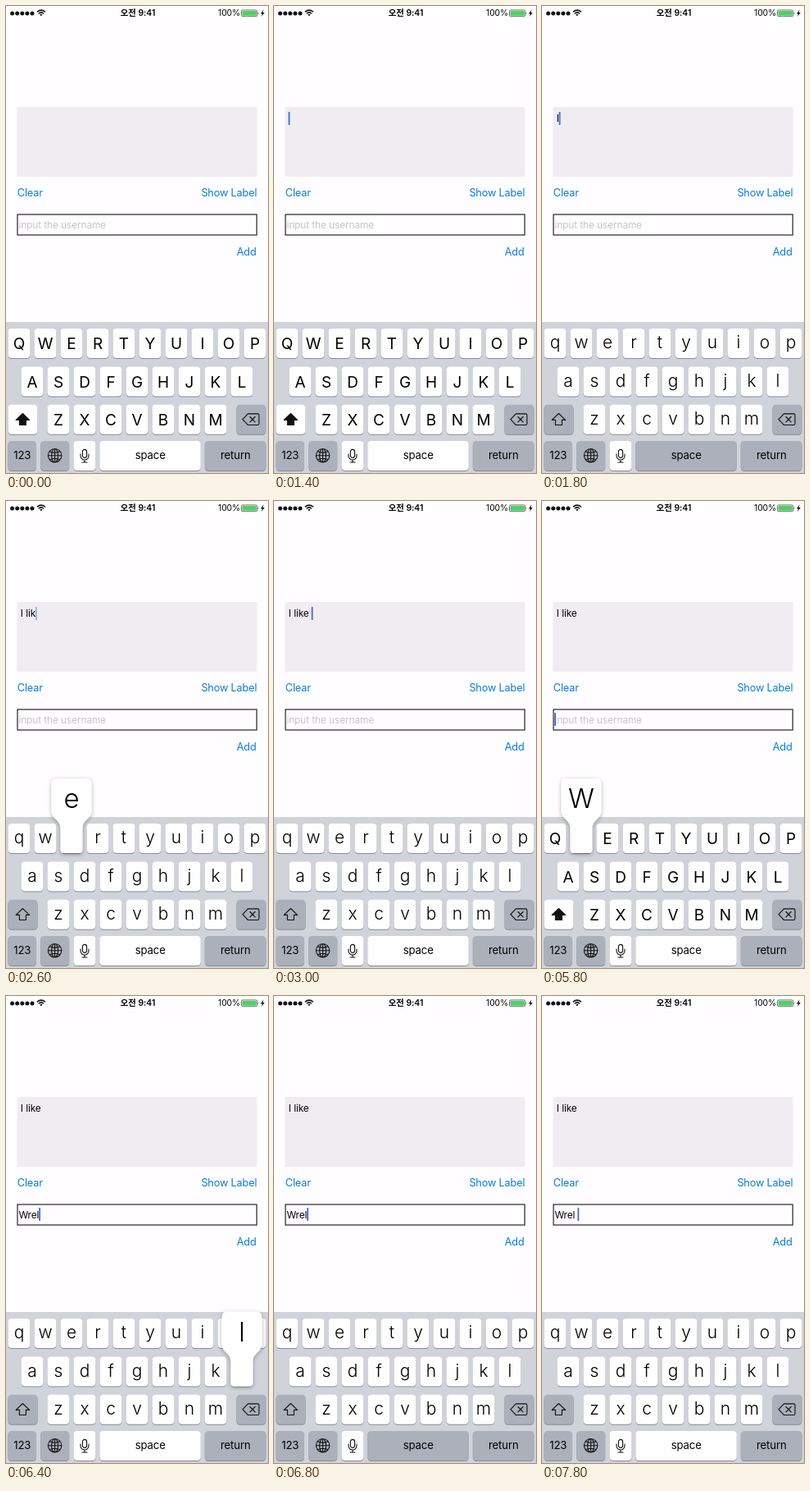
Recreate the animation shown at these times as an HTML page. Size 320x569 px, loop 8000 ms.

```html
<!DOCTYPE html>
<html lang="en">
<head>
<meta charset="utf-8">
<title>Keyboard demo</title>
<style>
html, body { margin: 0; width: 100%; height: 100%; overflow: hidden; background: #fffdff; }
svg { display: block; width: 100vw; height: 100vh; font-family: Inter, Roboto, sans-serif; }
text { white-space: pre; }
.link { font-size: 12.8px; letter-spacing: -.22px; fill: #087edb; }
.body { font-size: 11.9px; letter-spacing: -.1px; }
.word { font-size: 13.2px; letter-spacing: -.15px; text-anchor: middle; }
.letter { text-anchor: middle; }
.line { fill: none; stroke: #111; stroke-width: 1.1; stroke-linejoin: round; stroke-linecap: round; }
</style>
</head>
<body>
<svg id="stage" viewBox="0 0 320 569">
  <defs>
    <filter id="soft" x="-40%" y="-30%" width="180%" height="160%">
      <feDropShadow dx="0" dy="1.5" stdDeviation="2.5" flood-color="#000" flood-opacity=".32"/>
    </filter>
  </defs>
  <rect width="320" height="569" fill="#fffdff"/>

  <g id="dots"></g>
  <g fill="none" stroke="#111" stroke-width="1.5">
    <path d="M37.8 7.3Q42.9 2.9 48 7.3M39.7 9.3Q42.9 6.5 46.1 9.3"/>
    <path d="M42.9 12.2L41.2 10.5Q42.9 9.1 44.6 10.5Z" fill="#111" stroke="none"/>
  </g>
  <text x="161" y="12.4" text-anchor="middle" font-size="10.4" font-weight="600" style="font-family:Inter,'Noto Sans CJK KR','Noto Sans CJK',sans-serif">오전 9:41</text>
  <text x="259" y="12.4" font-size="10.4" letter-spacing="-.1">100%</text>
  <rect x="287.5" y="4.9" width="19.4" height="7.8" rx="1.6" fill="#fff" stroke="#333" stroke-width=".7"/>
  <rect x="288.5" y="5.9" width="17.4" height="5.8" rx=".8" fill="#4cd165"/>
  <path d="M307.6 7.4Q309.4 8.8 307.6 10.2Z" fill="#333"/>
  <path d="M314.6 4.3L311 9.4H313.1L312 13L315.8 7.9H313.6Z" fill="#111"/>

  <rect x="13.5" y="123" width="293" height="85" fill="#efedf2"/>
  <text class="body" id="note" x="17.8" y="141.2"></text>
  <text class="link" x="13.8" y="232.2">Clear</text>
  <text class="link" x="306.3" y="232.2" text-anchor="end">Show Label</text>
  <rect x="14" y="254" width="292.2" height="25" fill="#fffdff" stroke="#111" stroke-width="1.1"/>
  <text class="body" id="hint" x="15.4" y="270.6" fill="#c6c4ca">input the username</text>
  <text class="body" id="user" x="15.4" y="270.6"></text>
  <text class="link" x="305.6" y="304" text-anchor="end">Add</text>
  <rect id="caret" width="1.8" height="16" rx=".6" fill="#4269d6"/>

  <rect y="385" width="320" height="184" fill="#d0d3d9"/>
  <g id="keys"></g>
  <g id="popup">
    <path filter="url(#soft)" fill="#fffeff" d="M-17.5 -55H17.5Q24.5 -55 24.5 -48V-16C24.5 -5 13.5 -5 13.5 6V32Q13.5 36 9.5 36H-9.5Q-13.5 36 -13.5 32V6C-13.5 -5 -24.5 -5 -24.5 -16V-48Q-24.5 -55 -17.5 -55Z"/>
    <text class="letter" id="big" y="-19" font-size="33" font-weight="300"></text>
  </g>
</svg>
<script>
const LOOP = 8000, STEP = 200;
const GREY = '#abb0ba', WHITE = '#fffeff';
const $ = id => document.getElementById(id);

function add(parent, tag, attrs, text) {
  const el = document.createElementNS('http://www.w3.org/2000/svg', tag);
  for (const k in attrs) el.setAttribute(k, attrs[k]);
  if (text) el.textContent = text;
  parent.appendChild(el);
  return el;
}

function key(x, y, w, fill) {
  add($('keys'), 'rect', { x, y: y + 1, width: w, height: 36, rx: 4.2, fill: '#898c92' });
  return add($('keys'), 'rect', { x, y, width: w, height: 36, rx: 4.2, fill });
}
const icon = (d, attrs) => add($('keys'), 'path', { class: 'line', d, ...attrs });
const word = (x, s) => add($('keys'), 'text', { class: 'word', x, y: 552.3 }, s);

for (let i = 0; i < 5; i++) add($('dots'), 'circle', { cx: 7.6 + i * 6.1, cy: 9, r: 2.5, fill: '#111' });

const letters = {};
[['qwertyuiop', 16, 393], ['asdfghjkl', 32, 439.5], ['zxcvbnm', 64, 485.7]].forEach(([row, x0, y]) => {
  [...row].forEach((ch, i) => {
    const x = x0 + i * 32;
    key(x - 13.5, y, 27, WHITE);
    letters[ch] = { x, y, el: add($('keys'), 'text', { class: 'letter', x }) };
  });
});

const shiftKey = key(2.5, 485.7, 36, GREY);
const shiftIcon = icon('M20.4 496.5L28.6 504.4H24.4V510.5H16.4V504.4H12.2Z');
key(281.5, 485.7, 36, GREY);
icon('M295.5 496.9H307.2Q309 496.9 309 498.7V508.7Q309 510.5 307.2 510.5H295.5L289 503.7ZM298 500.5L304.2 506.9M304.2 500.5L298 506.9');
key(2.5, 530, 34.5, GREY);
word(19.8, '123');
key(42.2, 530, 35, GREY);
icon('M51.4 547.7a8.2 8.2 0 1 0 16.4 0a8.2 8.2 0 1 0 -16.4 0M55.6 547.7a4 8.2 0 1 0 8 0a4 8.2 0 1 0 -8 0M59.6 539.5V555.9M51.4 547.7H67.8M53.3 542.8Q59.6 545.6 65.9 542.8M53.3 552.6Q59.6 549.8 65.9 552.6', { 'stroke-width': .9 });
key(82.5, 530, 27, WHITE);
icon('M93.4 543a2.6 2.6 0 0 1 5.2 0V547.8a2.6 2.6 0 0 1 -5.2 0ZM91 546V548a5 5 0 0 0 10 0V546M96 553V556M93 556H99');
const spaceKey = key(114.3, 530, 123.5, WHITE);
word(176.2, 'space');
key(242.8, 530, 74.6, GREY);
word(280.3, 'return');

// Each entry: start time, value held until the next entry
const NOTE = [[0, ''], [1800, 'I'], [2000, 'I '], [2200, 'I l'], [2400, 'I li'], [2600, 'I lik'], [2800, 'I like'], [3000, 'I like ']];
const USER = [[0, ''], [6000, 'Wr'], [6200, 'Wre'], [6400, 'Wrel'], [7000, 'Wrel ']];
const PRESS = [[0, ''], [1600, 'I'], [1800, ' '], [2000, 'l'], [2200, 'i'], [2400, 'k'], [2600, 'e'], [2800, ' '], [3000, ''],
  [5800, 'W'], [6000, 'r'], [6200, 'e'], [6400, 'l'], [6600, ''], [6800, ' '], [7000, '']];
const CAPS = [[0, true], [1800, false], [5400, true], [6000, false]];
const BLINK = [[0, -700], [1600, 1600], [2000, 2000], [2800, 2800], [5400, 5400], [6000, 6000], [6800, 6800]];

const at = (track, t) => track.filter(e => e[0] <= t).pop()[1];

function blink(p) {
  if (p < .5) return 1;
  if (p < .7) return (.7 - p) / .2;
  return p < .85 ? 0 : (p - .85) / .15;
}

function setCase(caps) {
  for (const ch in letters) {
    const { y, el } = letters[ch];
    el.textContent = caps ? ch.toUpperCase() : ch;
    el.setAttribute('y', y + (caps ? 25.4 : 24.2));
    el.setAttribute('font-size', caps ? 19 : 21);
    el.setAttribute('font-weight', caps ? 400 : 300);
  }
  shiftKey.setAttribute('fill', caps ? WHITE : GREY);
  shiftIcon.style.fill = caps ? '#111' : 'none';
}

function draw(t) {
  const inField = t >= 5400, press = at(PRESS, t), user = at(USER, t);
  $('note').textContent = at(NOTE, t);
  $('user').textContent = user;
  $('hint').style.display = user ? 'none' : '';
  setCase(at(CAPS, t));

  const field = $(inField ? 'user' : 'note');
  const width = field.textContent ? field.getComputedTextLength() : 0;
  $('caret').setAttribute('x', +field.getAttribute('x') + width - .2);
  $('caret').setAttribute('y', inField ? 258 : 129);
  $('caret').setAttribute('opacity', blink((t - at(BLINK, t)) % 1000 / 1000));

  spaceKey.setAttribute('fill', press === ' ' ? GREY : WHITE);
  const target = letters[press.toLowerCase()];
  $('popup').style.display = target ? '' : 'none';
  if (target) {
    $('popup').setAttribute('transform', `translate(${target.x} ${target.y})`);
    $('big').textContent = press;
  }
}

function tick() {
  const t = performance.now() % LOOP;
  draw(Math.floor(t / STEP) * STEP);
  requestAnimationFrame(tick);
}
tick();
</script>
</body>
</html>
```
